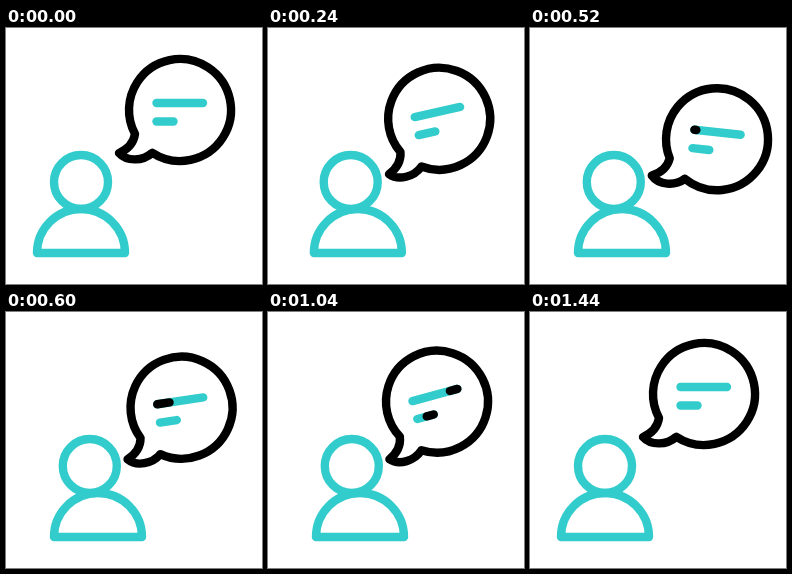
These frames come from a looping animation (256x256 px, 1.48 s). An HTML page with a canvas:

```html
<!DOCTYPE html>
<html lang="en">
<head>
<meta charset="utf-8">
<title>Talking person</title>
<style>
  html, body { margin: 0; width: 100%; height: 100%; overflow: hidden; background: #fff; }
  canvas { display: block; width: 256px; height: 256px; }
</style>
</head>
<body>
<canvas id="stage"></canvas>
<script>
const LOOP = 1480, STEP = 40;
const TEAL = '#33cccc', BLACK = '#000';
const PIVOT = { x: 112, y: 126 };

const canvas = document.getElementById('stage');
const ctx = canvas.getContext('2d');
const scale = window.devicePixelRatio || 1;
canvas.width = canvas.height = 256 * scale;

const linear = (t, start, duration) => Math.min(1, Math.max(0, (t - start) / duration));
const easeOut = (t, start, duration) => 1 - (1 - linear(t, start, duration)) ** 3;

// Rises from 0 to 1, holds, then falls back to 0.
const pulse = (t, inAt, inFor, outAt, outFor) =>
  easeOut(t, inAt, inFor) - easeOut(t, outAt, outFor);

function stroke(color, trace) {
  ctx.strokeStyle = color;
  ctx.beginPath();
  trace();
  ctx.stroke();
}

function drawPerson(shift) {
  const bodyX = 75 + 17 * shift;
  stroke(TEAL, () => {
    ctx.arc(bodyX, 225, 44, Math.PI, 0);
    ctx.closePath();
  });
  stroke(TEAL, () => ctx.arc(75 + 8.8 * shift, 154, 27, 0, 2 * Math.PI));
}

function drawBubble() {
  const cx = 174, cy = 82;
  stroke(BLACK, () => {
    ctx.arc(cx, cy, 51, Math.atan2(43, -28), Math.atan2(24, -45), true);
    ctx.quadraticCurveTo(127, 119, 113, 125);
    ctx.bezierCurveTo(121, 134, 137, 133, 146, 125);
    ctx.closePath();
  });
}

// A teal line with a black section running from one end to the other.
function drawTextLine(x, y, length, from, to) {
  const segment = (color, a, b) => stroke(color, () => {
    ctx.moveTo(x + length * a, y);
    ctx.lineTo(x + length * b, y);
  });
  segment(TEAL, 0, 1);
  if (to > from) segment(BLACK, from, to);
}

function draw(t) {
  const shift = pulse(t, 80, 320, 1120, 310);
  const slide = pulse(t, 80, 255, 1140, 300);
  const tilt = pulse(t, 80, 360, 1127, 310);
  const nod = pulse(t, 310, 210, 520, 250);
  const angle = -15.2 * tilt + 21.3 * nod;

  ctx.setTransform(scale, 0, 0, scale, 0, 0);
  ctx.fillStyle = '#fff';
  ctx.fillRect(0, 0, 256, 256);
  ctx.lineWidth = 8.4;
  ctx.lineCap = ctx.lineJoin = 'round';

  drawPerson(shift);

  ctx.translate(PIVOT.x + 8.7 * slide, PIVOT.y + 22.4 * slide);
  ctx.rotate(angle * Math.PI / 180);
  ctx.translate(-PIVOT.x, -PIVOT.y);
  drawBubble();
  drawTextLine(150.5, 75, 46.5, linear(t, 740, 360), linear(t, 505, 355));
  drawTextLine(150.5, 93.5, 17, linear(t, 840, 350), linear(t, 620, 360));
}

function tick() {
  draw(Math.floor((performance.now() - startTime) % LOOP / STEP) * STEP);
  requestAnimationFrame(tick);
}

const startTime = performance.now();
tick();
</script>
</body>
</html>
```
